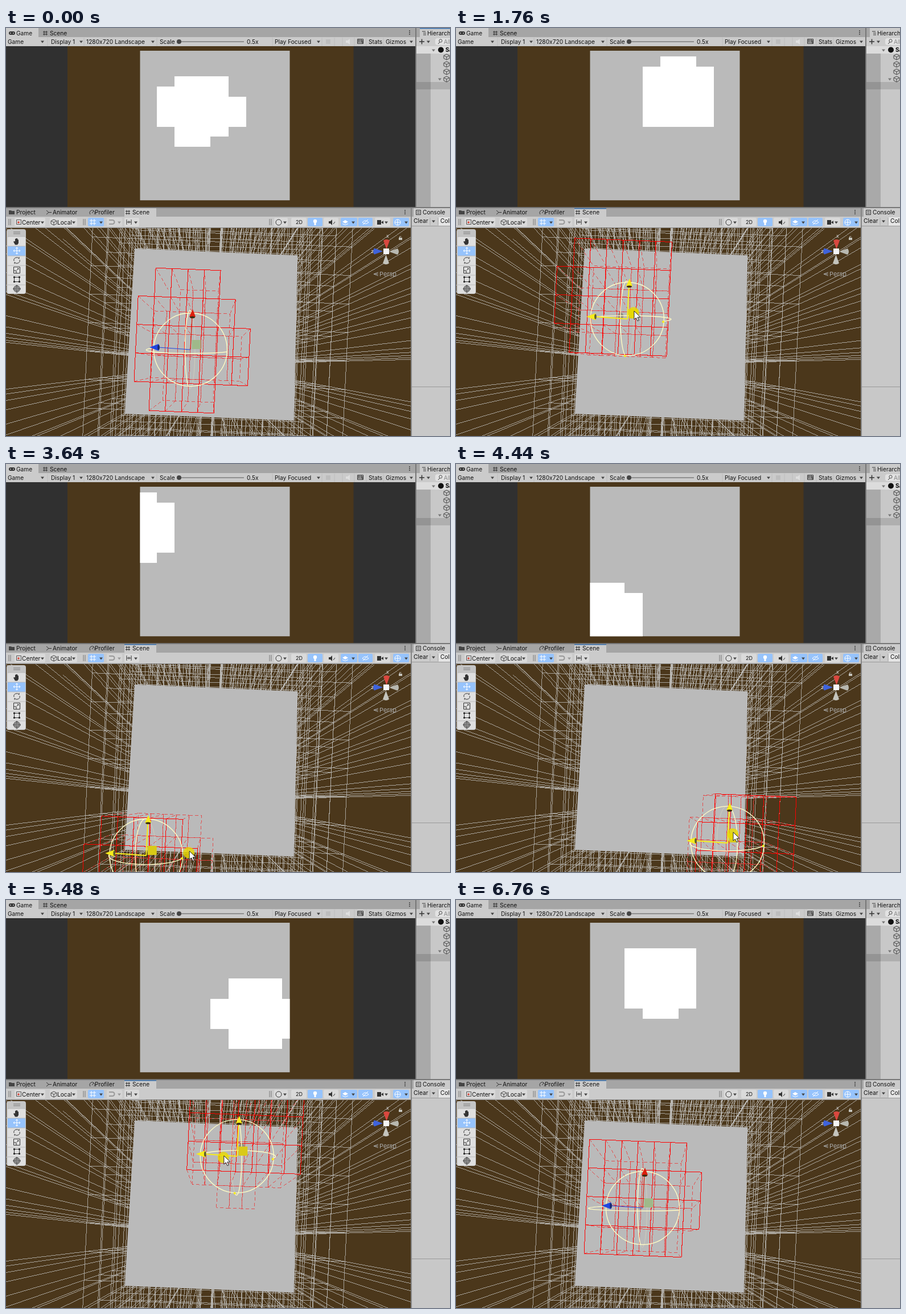
Animation, 780 px wide and 718 px high, one loop 7.2 s. Source, as an HTML page:

```html
<!DOCTYPE html>
<html lang="en">
<head>
<meta charset="utf-8">
<title>Clustered light culling</title>
<style>
html, body { margin: 0; width: 100%; height: 100%; overflow: hidden; background: #c8c8c8; }
svg { display: block; width: 780px; height: 718px; }
text { font-family: Inter, "Liberation Sans", sans-serif; font-size: 10.2px; fill: #111; }
.crisp { shape-rendering: crispEdges; }
</style>
</head>
<body>
<svg id="stage" viewBox="0 0 780 718" xmlns="http://www.w3.org/2000/svg"></svg>
<script>
const BROWN = '#4b371b', PANEL = '#cbcbcb', TABS = '#a5a5a5', GREY = '#bababa', BLUE = '#96c3fc';
const LOOP = 7200, RADIUS = 53, CELLS = 16;
const GRAB = 940, DROP = 6160;
const VP = [360, 592];
const SLICES = [1, 0.88, 0.78, 0.7, 0.63];

// Static markup helpers
const rect = (x, y, w, h, fill, rx = 0) =>
  `<rect x="${x}" y="${y}" width="${w}" height="${h}" rx="${rx}" fill="${fill}"/>`;
const text = (x, y, s, extra = '') => `<text x="${x}" y="${y}" ${extra}>${s}</text>`;
const fillPath = (d, fill, extra = '') => `<path d="${d}" fill="${fill}" ${extra}/>`;
const stroke = (d, color = '#333', w = 1, extra = '') =>
  `<path d="${d}" fill="none" stroke="${color}" stroke-width="${w}" ${extra}/>`;
const circle = (x, y, r, fill, extra = '') => `<circle cx="${x}" cy="${y}" r="${r}" fill="${fill}" ${extra}/>`;
const drop = (x, y, c = '#444') => fillPath(`M${x - 3} ${y - 1.5}h6l-3 4z`, c);
const hash = (x, y) => stroke(`M${x - 2} ${y - 4}v8M${x + 2} ${y - 4}v8M${x - 4} ${y - 2}h8M${x - 4} ${y + 2}h8`);
const grip = x => stroke(`M${x} 336v11M${x + 3} 336v11`, '#777');
const dots = (x, y) => [-3, 0, 3].map(d => circle(x, y + d, 0.9, '#333')).join('');
const cube = (x, y) => stroke(`M${x} ${y - 5}l5 2.5v5l-5 2.5l-5-2.5v-5zM${x - 5} ${y - 2.5}l5 2.5l5-2.5M${x} ${y}v5`, '#444');

// Corner of the front cluster grid in the scene view, scaled towards the vanishing point
function corner(c, r, s = 1) {
  const x = 225 + 28.5 * (r - 3) + 2.4 * (c - 6);
  const y = 622 - 50.2 * (c - 6) + 1.1 * (r - 3);
  return [VP[0] + (x - VP[0]) * s, VP[1] + (y - VP[1]) * s];
}
const pt = p => p[0].toFixed(1) + ' ' + p[1].toFixed(1);
const seg = (a, b) => `M${pt(a)}L${pt(b)}`;

function wires() {
  let d = '';
  for (let i = 0; i <= CELLS; i++) {
    for (let j = 0; j <= CELLS; j++) d += seg(corner(i, j, 0.6), corner(i, j, 14));
    for (const s of SLICES)
      d += seg(corner(i, 0, s), corner(i, CELLS, s)) + seg(corner(0, i, s), corner(CELLS, i, s));
  }
  return stroke(d, '#bebdba', 0.8, 'class="crisp"');
}

function gamePanel() {
  return rect(0, 0, 719, 16, TABS) + rect(0, 0, 57, 17, PANEL) + rect(0, 16, 719, 16, PANEL) +
    rect(5, 6, 11, 6, '#333', 3) + circle(8, 9, 1, PANEL) + circle(13, 9, 1, PANEL) +
    text(18, 12.5, 'Game') + hash(69, 9) + text(77, 12.5, 'Scene') + dots(709, 8) +
    text(3, 27.5, 'Game') + drop(64, 24) + text(79, 27.5, 'Display 1') + drop(132, 24) +
    text(141, 27.5, '1280x720 Landscape') + drop(258, 24) + text(270, 27.5, 'Scale') +
    rect(304, 23.4, 114, 1.4, '#777') + circle(304, 24, 4, '#444') + text(423, 27.5, '0.5x') +
    text(472, 27.5, 'Play Focused') + drop(549, 24) +
    stroke('M73 17v15M137 17v15M265 17v15M468 17v15M555 17v15M577 17v15M591 17v15M612 17v15M633 17v15M663 17v15', '#bcbcbc') +
    rect(562, 20, 8, 8, '#bdbdbd') + fillPath('M597 22h3l4-3v10l-4-3h-3z', '#dedede') +
    stroke('M617.5 19.5h10v8h-10zM617 22h11M617 25h11M620 19v6M624 19v6M626 22v5') +
    text(637, 27.5, 'Stats') + text(667, 27.5, 'Gizmos') + drop(712, 24) +
    rect(0, 32, 719, 283, '#303030') + rect(108, 32, 502.5, 283, BROWN) + rect(235.5, 40, 263, 263.2, GREY);
}

function sidePanels() {
  let s = rect(719, 0, 2, 317, '#777') + rect(721, 0, 59, 16, TABS) + rect(727, 0, 53, 17, PANEL) +
    rect(721, 16, 59, 16, PANEL) + rect(721, 32, 59, 283, '#c8c8c8') +
    rect(721, 32, 25, 283, '#a9a9a9') + rect(721, 32, 59, 13, '#dcdcdc') +
    rect(746, 95, 34, 13, '#afafaf') + rect(721, 95, 25, 13, '#949494') +
    stroke('M731 6h6M733 9h5M733 12h5') + text(740, 12.5, 'Hierarchy') +
    stroke('M726 24h9M730.5 19.5v9', '#333', 1.5) + drop(742, 24) +
    rect(754, 18, 30, 12, '#e2e2e2', 4) + stroke('M762 25l-3 3') +
    `<circle cx="763.5" cy="22.5" r="2.6" fill="none" stroke="#444"/>` + text(769, 27.5, 'All', 'style="fill:#888"') +
    drop(751, 39, '#777') + circle(764, 38.5, 5, '#111') + text(772, 42, 'SampleScene', 'font-weight="700"') +
    drop(762, 90, '#777');
  for (const y of [51, 64, 77, 90]) s += cube(774, y);
  return s + rect(711, 317, 2, 401, '#858585') + rect(713, 317, 67, 15, TABS) + rect(716, 317, 64, 16, PANEL) +
    rect(713, 332, 67, 16, PANEL) + rect(713, 348, 67, 370, '#c8c8c8') +
    stroke('M713 348.5h67M713 631.5h67', '#999') +
    stroke('M720.5 320.5h8v8h-8zM722 323h5M722 326h5') + text(732, 328.3, 'Console') +
    text(716, 343.3, 'Clear') + drop(751, 340) + stroke('M745 334v13M759 334v13', '#aaa') +
    rect(760, 333, 20, 15, '#e5e5e5') + text(763, 343.3, 'Collapse');
}

function sceneBars() {
  return rect(0, 315, 780, 2, '#777') + rect(0, 317, 711, 15, TABS) + rect(208, 317, 56, 16, PANEL) +
    rect(0, 332, 711, 19, PANEL) + rect(0, 351, 711, 1, '#888') +
    fillPath('M5 321h4l1 1h5v6h-10z', '#444') + text(18, 328.3, 'Project') +
    stroke('M71 321l4 3.5l-4 3.5M75 324.5h5') + text(82, 328.3, 'Animator') +
    stroke('M148 328a4.5 4.5 0 1 1 7 0M151 326l3-4') + text(156, 328.3, 'Profiler') +
    hash(214, 324.5) + text(222, 328.3, 'Scene') + dots(701, 324) +
    grip(5) + rect(15, 334, 54, 15, '#dadada', 2) + stroke('M18.5 337.5h8v8h-8z', '#555') +
    circle(22, 342, 1.8, '#d4453a') + text(28, 345.5, 'Center') + drop(64, 342) +
    rect(77, 334, 48, 15, '#dadada', 2) + cube(84, 342) + text(90, 345.5, 'Local') + drop(119, 342) +
    grip(136) + rect(144, 334, 28, 15, BLUE, 2) + stroke('M147 339h11M147 344h11M150 336v11M155 336v11', '#fff') +
    drop(167, 342) + rect(177, 334, 27, 15, '#d5d5d5', 2) + stroke('M181 338h6M181 345h6M187 338a3.5 3.5 0 0 1 0 7', '#999', 2) +
    drop(199, 342, '#999') + rect(208, 334, 26, 15, '#dadada', 2) +
    stroke('M212 337v9M220 337v9M212 341.5h8M216 339v5') + drop(228, 342) +
    grip(463) + rect(471, 334, 24, 15, '#dadada', 2) + `<circle cx="479" cy="342" r="5" fill="#ddd" stroke="#333"/>` +
    fillPath('M476 345a5 5 0 0 0 7-6a5 5 0 0 1-7 6z', '#333') + drop(490, 342) +
    rect(501, 334, 27, 15, '#dadada', 2) + text(509, 345.3, '2D', 'style="font-size:9px"') +
    rect(530, 334, 26, 15, BLUE, 2) + circle(543, 340, 3.2, '#fff') + rect(541.5, 343, 3, 4, '#fff') +
    rect(558, 334, 26, 15, '#dadada', 2) + fillPath('M567 340h3l3-3v10l-3-3h-3z', '#333') + stroke('M575 345l3-4') +
    rect(588, 334, 29, 15, BLUE, 2) + fillPath('M591 341l5-3l5 3l-5 3zM591 345l5 2l5-2v-1l-5 2l-5-2z', '#fff') + drop(610, 342) +
    rect(619, 334, 25, 15, BLUE, 2) + stroke('M626 342q5.5-6 11 0q-5.5 5-11 0M627 346l9-9', '#fff') +
    rect(648, 334, 27, 15, '#dadada', 2) + rect(652, 338, 7, 8, '#333') + fillPath('M659 342l4-3v6z', '#333') + drop(668, 342) +
    rect(680, 334, 28, 15, BLUE, 2) + `<circle cx="688" cy="342" r="5" fill="none" stroke="#fff"/>` +
    stroke('M683 342h10M688 337v10', '#fff') + drop(703, 342);
}

function sceneOverlay() {
  const cone = (x, y, a, fill) =>
    `<g transform="translate(${x} ${y}) rotate(${a})">${fillPath('M0 10L-5.5-5Q0-9 5.5-5z', fill)}</g>`;
  let s = rect(1, 354, 34, 114, '#c4c4c4', 4) + rect(3, 367, 31, 100, '#dfdfdf', 2) +
    rect(3, 384, 31, 17, BLUE) + stroke('M13 359h12M13 362h12', '#777');
  for (let y = 367; y < 460; y += 17) s += stroke(`M3 ${y}h31`, '#b0b0b0', 0.8);
  s += fillPath('M13 376l2-1l1 1v-5h1.5v4v-5h1.5v5v-4.5h1.5v5v-3h1.5v6l-2 3h-4z', '#333') +
    stroke('M13 392h12M19 386v12M15 390l-2 2l2 2M23 390l2 2l-2 2M17 388l2-2l2 2M17 396l2 2l2-2', '#fff') +
    stroke('M14 410a5 5 0 0 1 9-4v-3M24 408a5 5 0 0 1-9 4v3') +
    stroke('M13.5 420.5h11v11h-11zM14 427h4v4M19 426l3-3M20 423h2v2') +
    stroke('M14.5 438.5h9v8h-9z') + [14, 23].map(x => rect(x - 1, 437, 3, 3, '#333') + rect(x - 1, 445, 3, 3, '#333')).join('') +
    `<circle cx="19" cy="459" r="5.5" fill="none" stroke="#333"/>` + stroke('M12 459h14M19 452v14M16 456h6v6h-6z');
  return s + cone(668.5, 379, 0, '#d9483f') + cone(652, 393, -90, '#3f63dc') +
    cone(683, 393.5, 90, '#b8b8b0') + cone(667.5, 409, 180, '#c4c4bd') + rect(663, 388, 10, 10, '#f6f6f6') +
    text(668, 369, 'x', 'style="fill:#ddd;font-size:9px"') + text(641, 396, 'z', 'style="fill:#ddd;font-size:9px"') +
    rect(690, 369, 6, 4, '#c4c4bd') + stroke('M691.5 369v-2h3', '#c4c4bd') +
    stroke('M654 430l-8 3l8 3M646 433h8', '#aaa') + text(656, 437, 'Persp', 'style="fill:#aaa;font-size:11px"');
}

document.getElementById('stage').innerHTML =
  `<defs><clipPath id="plane"><rect x="235.5" y="40" width="263" height="263.2"/></clipPath>
   <clipPath id="view"><rect y="352" width="711" height="366"/></clipPath></defs>` +
  rect(0, 0, 780, 718, PANEL) + gamePanel() +
  '<path id="lit" class="crisp" fill="#fff" clip-path="url(#plane)"/>' +
  '<g clip-path="url(#view)">' + rect(0, 352, 711, 366, BROWN) + wires() +
  fillPath('M226 388L512.5 400L506 691L208.5 679z', GREY) +
  stroke('', '#f00', 0.8, 'id="back" class="crisp" stroke-dasharray="6 4" opacity=".7"') +
  stroke('', '#f00', 1, 'id="front" class="crisp"') +
  '<g id="gizmo"></g>' + sceneOverlay() + '</g>' + sceneBars() + sidePanels() +
  '<rect id="focus" height="1.5" fill="#3a72b0"/>' +
  '<g id="cursor"><circle r="10" cy="1" fill="#eadb00" opacity=".8"/>' +
  '<path d="M1-2v15l3.5-3l2.5 5.5l2.5-1l-2.5-5.5h5z" fill="#fff" stroke="#222"/></g>';

const $ = id => document.getElementById(id);
const set = (id, attrs) => Object.entries(attrs).forEach(([k, v]) => $(id).setAttribute(k, v));

// time, handle x, y, light centre x, y in the game view
const LIGHT = [
  [0, 324, 566, 341.5, 141], [GRAB, 324, 566, 341.5, 141], [1350, 318, 525, 375, 133],
  [1760, 301, 512, 391, 115], [2200, 262, 545, 350, 88], [2600, 266, 609, 301, 94.7],
  [3100, 250, 665, 255, 98], [3640, 246, 689, 233, 112], [4040, 430, 695, 240, 235],
  [4440, 477, 667, 258, 268], [4840, 488, 600, 310, 275], [5160, 465, 500, 400, 255],
  [5480, 406, 451, 439, 201], [5640, 350, 452, 445, 150], [5880, 312, 490, 415, 128],
  [6120, 328, 542, 361, 141.5], [LOOP, 328, 542, 361, 141.5]
];
const POINTER = [
  [120, 594, 692], [720, 335, 559], [GRAB, 335, 559], [1350, 330, 512], [1760, 312, 500],
  [2200, 270, 553], [2600, 277, 622], [3100, 258, 678], [3640, 321, 683], [4040, 455, 690],
  [4440, 486, 650], [4840, 492, 585], [5160, 455, 478], [5480, 382, 452], [5640, 345, 455],
  [5880, 325, 500], [6120, 336, 537], [6200, 336, 537], [6440, 728, 674], [6760, 746, 735]
];

// Smooth curve through the keys, flat where a hold begins or ends
function sample(keys, t) {
  const n = keys.length - 1;
  let i = 0;
  while (i < n - 1 && t >= keys[i + 1][0]) i++;
  const a = keys[i], b = keys[i + 1], dt = b[0] - a[0];
  const u = Math.min(1, Math.max(0, (t - a[0]) / dt));
  const slope = (j, k) => {
    if (j === 0 || j === n) return 0;
    const p = keys[j - 1], q = keys[j], r = keys[j + 1];
    return p[1] === q[1] && p[2] === q[2] || q[1] === r[1] && q[2] === r[2] ? 0 : (r[k] - p[k]) / (r[0] - p[0]);
  };
  return a.slice(1).map((v, m) => {
    const k = m + 1, w = 1 - u;
    return v * (1 + 2 * u) * w * w + b[k] * u * u * (3 - 2 * u) +
      dt * (slope(i, k) * u * w * w - slope(i + 1, k) * u * u * w);
  });
}

const gameX = c => 108 + 31.4 * c, gameY = r => 32.4 + 17.66 * r;
const gap = (v, lo, hi) => Math.max(lo - v, 0, v - hi);

function touched(x, y) {
  const out = [];
  for (let c = 0; c < CELLS; c++)
    for (let r = 0; r < CELLS; r++)
      if (Math.hypot(gap(x, gameX(c), gameX(c + 1)), gap(y, gameY(r), gameY(r + 1))) < RADIUS) out.push([c, r]);
  return out;
}

const ring = ([c, r]) => [[c, r], [c + 1, r], [c + 1, r + 1], [c, r + 1]];
const quad = (cell, s) => 'M' + ring(cell).map(p => pt(corner(p[0], p[1], s))).join('L') + 'z';
const tile = ([c, r]) => {
  const [x, y, x2, y2] = [gameX(c), gameY(r), gameX(c + 1), gameY(r + 1)].map(Math.round);
  return `M${x} ${y}H${x2}V${y2}H${x}z`;
};

// Light centre as seen through the nearest slice
function nearCentre(gx, gy) {
  const u = (gx - 226 + 17 * (gy - 388) / 291) / 293;
  const v = (679 + 12 * (gx - 209) / 297 - gy) / 291.5;
  return [236 + 263 * v, 43 + 263 * u];
}

function gizmo(gx, gy, on) {
  const ox = gx - 363, oy = gy - 540, cream = '#fffbc4';
  const rx = 3 + Math.abs(ox) * 0.13, ry = 3 + Math.abs(oy) * 0.08;
  const up = on ? '#f7ec1c' : '#dc1f0d', side = on ? '#f7ec1c' : '#2145e0', box = on ? '#d9ca17' : '#9fb98a';
  return `<g transform="translate(${gx.toFixed(2)} ${gy.toFixed(2)})">` +
    `<ellipse cx="${ox * 0.19}" cy="${oy * 0.19}" rx="5" ry="6" fill="#77735c" opacity="${on ? 0.6 : 0.15}"/>` +
    `<circle r="64.5" fill="none" stroke="${cream}" stroke-width="1.4"/>` +
    stroke(`M2.5-64A${rx} 64 0 0 ${ox < 0 ? 0 : 1} -4 64`, cream, 1.4) +
    stroke(`M-64-3A64 ${ry} 0 0 ${oy < 0 ? 1 : 0} 64 4`, cream, 1.4) +
    stroke(`M2.5-64A${rx} 64 0 0 ${ox < 0 ? 1 : 0} -4 64`, cream, 0.7, 'opacity=".4"') +
    rect(2.5, -17, 16, 16, box) +
    stroke('M0 0L3-58', up, on ? 2 : 1.2) + stroke('M0 0L-56-4', side, on ? 2 : 1.2) +
    fillPath('M4-71L-2-58Q3-54 9-58z', up) + '<ellipse cx="3.5" cy="-57" rx="4.5" ry="1.8" fill="#3a2a10"/>' +
    fillPath('M-72-4L-56-10Q-52-4-56 2z', side) + '<ellipse cx="-56" cy="-4" rx="1.8" ry="4.5" fill="#16203a" opacity=".7"/>' +
    (on ? circle(-4, 65, 2, '#f7ec1c') + circle(63, 5, 2, '#f7ec1c') : '') + '</g>';
}

function draw(t) {
  const [gx, gy, cx, cy] = sample(LIGHT, t);
  const lit = touched(cx, cy);
  set('lit', { d: lit.map(tile).join('') });

  const [nx, ny] = nearCentre(gx, gy);
  const near = touched((nx + cx) / 2, (ny + cy) / 2);
  set('front', { d: near.map(q => quad(q, 1)).join('') });
  const rays = new Map();
  near.forEach(q => ring(q).forEach(p => rays.set(p.join(), p)));
  set('back', { d: lit.map(q => quad(q, 0.78)).join('') +
    [...rays.values()].map(([c, r]) => seg(corner(c, r), corner(c, r, 0.78))).join('') });

  $('gizmo').innerHTML = gizmo(gx, gy, t >= GRAB && t < DROP);
  set('focus', t < GRAB ? { x: 727, y: 0, width: 53 } : { x: 208, y: 317, width: 56 });
  const [px, py] = sample(POINTER, t);
  set('cursor', {
    transform: `translate(${px.toFixed(1)} ${py.toFixed(1)})`,
    visibility: t >= 120 && t < 6760 ? 'visible' : 'hidden'
  });
}

const start = performance.now();
function tick(now) {
  draw(Math.max(0, now - start) % LOOP);
  requestAnimationFrame(tick);
}
draw(0);
requestAnimationFrame(tick);
</script>
</body>
</html>
```
